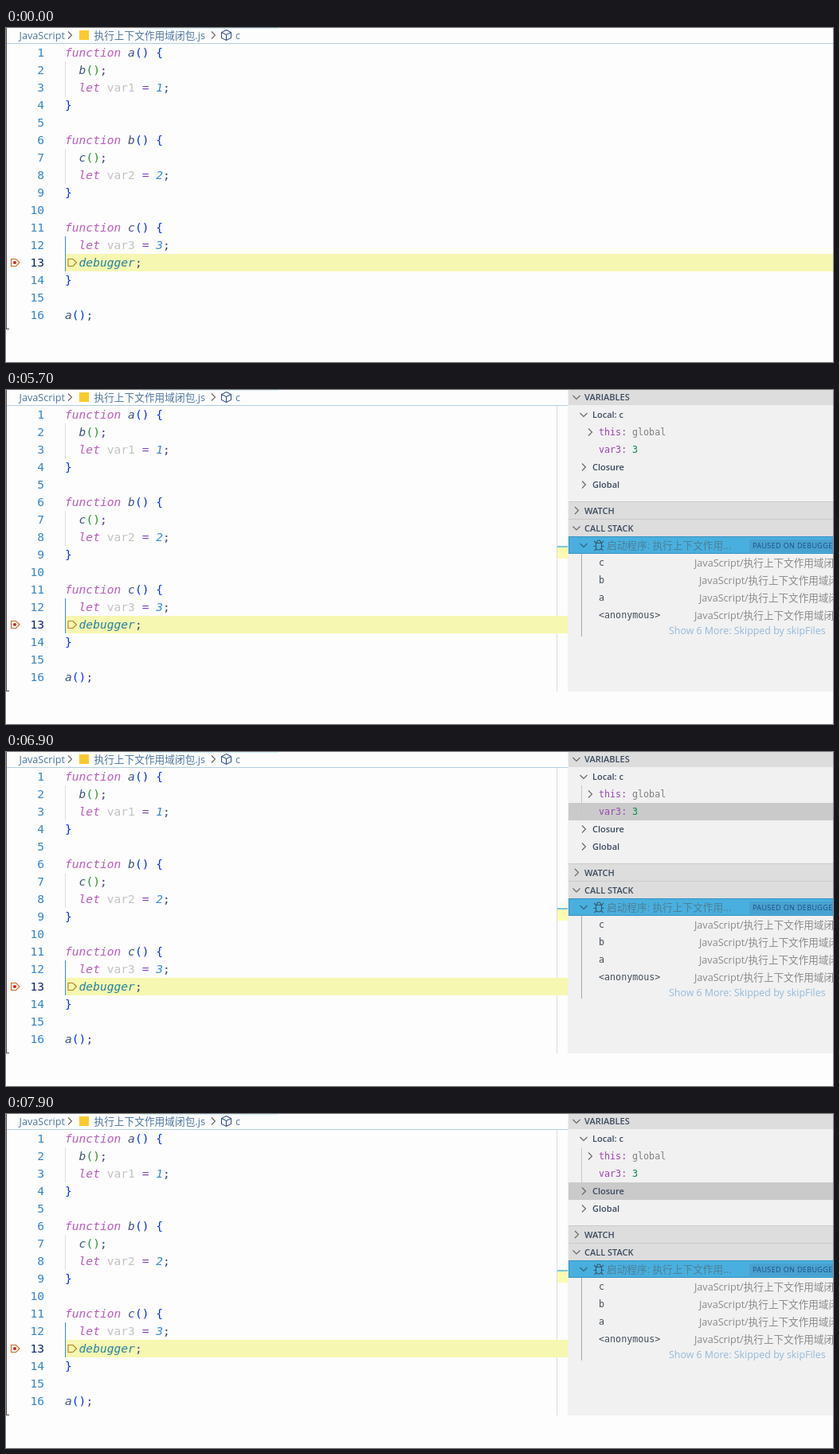
Animation of 1038 by 420 pixels, one loop 8000 ms. Source, as an HTML page:

```html
<!DOCTYPE html>
<html lang="zh">
<head>
<meta charset="utf-8">
<title>Debugger panel</title>
<style>
html, body { margin: 0; width: 100%; height: 100%; overflow: hidden; background: #fdfdfd; }
svg { display: block; width: 1038px; height: 420px; }
text { white-space: pre; font-family: "Open Sans", "Noto Sans CJK SC", "Noto Sans CJK", sans-serif; }
.code { font: 14.6px "DejaVu Sans Mono", monospace; }
.mono { font: 11.7px "DejaVu Sans Mono", monospace; }
.head { font-weight: 600; }
.icon { fill: none; stroke-width: 1.1; }
</style>
</head>
<body>
<svg id="stage" viewBox="0 0 1038 420">
  <defs><filter id="glow" x="-10%" y="-60%" width="120%" height="220%"><feGaussianBlur stdDeviation="2.5"/></filter></defs>
  <g id="editor"></g>
  <rect id="patch" x="932" y="101" width="106" height="37" fill="#fff"/>
  <g id="tips"></g>
  <g id="panel"></g>
</svg>
<script>
const $ = id => document.getElementById(id);
const rect = (x, y, w, h, fill, more = '') =>
  `<rect x="${x}" y="${y}" width="${w}" height="${h}" fill="${fill}" ${more}/>`;
const text = (x, y, str, size, fill, more = '') =>
  `<text x="${x}" y="${y}" font-size="${size}" fill="${fill}" ${more}>${str}</text>`;
const mono = (x, y, str, fill) => text(x, y, str, 11.7, fill, 'class="mono"');
const icon = (d, stroke) => `<path class="icon" d="${d}" stroke="${stroke}"/>`;
const right = (x, y, color = '#666') => icon(`M${x - 2} ${y - 4.5}l4.5 4.5l-4.5 4.5`, color);
const down = (x, y, color = '#666') => icon(`M${x - 4.5} ${y - 2}l4.5 4.5l4.5 -4.5`, color);
const marker = (x, color) => icon(`M${x + .5} 290.5h6l4.5 4.5l-4.5 4.5h-6z`, color);
const FILE = '执行上下文作用域闭包.js';

// Code
const SOURCE = `function a() {
  b();
  let var1 = 1;
}

function b() {
  c();
  let var2 = 2;
}

function c() {
  let var3 = 3;
  debugger;
}

a();`;

function highlight(line) {
  const bracket = line[0] === ' ' ? '#319331' : '#0431fa';
  return line.replace(/[a-z]+\d?|\d|[(){}=;]/g, token => {
    const color = /^(function|let)$/.test(token) ? '#b95bbd'
      : /^var/.test(token) ? '#c3c3c3'
      : token === 'debugger' ? '#2484a0'
      : /\d/.test(token) ? '#3b8bce'
      : token === '=' ? '#8149b5'
      : token === ';' ? '#3b4a78'
      : /\w/.test(token) ? '#41557f' : bracket;
    const italic = /[a-z]+$|^\d/.test(token) ? ' font-style="italic"' : '';
    return `<tspan fill="${color}"${italic}>${token}</tspan>`;
  });
}

const lines = SOURCE.split('\n').map((line, i) => {
  const y = 36 + i * 22;
  return text(48, y, i + 1, 14.6, i === 12 ? '#0b216f' : '#3586c8', 'class="code" text-anchor="end"')
    + text(74, y, highlight(line), 14.6, '#333', 'class="code"');
}).join('');

$('editor').innerHTML =
  rect(170, 0, 172, 1, '#d5f0fa') + rect(0, 19, 1038, 1, '#b3cfdf')
  + rect(0, 0, 1, 379, '#5b4a4c') + rect(0, 378, 4, 1, '#5b4a4c')
  + text(16.5, 14, 'JavaScript', 12.7, '#4f76a0') + right(80, 9)
  + rect(92, 3, 12, 12, '#fdca2c')
  + text(110.5, 14, FILE, 12.7, '#4f76a0') + right(260, 9)
  + icon('M276.5 2.5l6 3v7l-6 3l-6 -3v-7zM270.5 5.5l6 3l6 -3M276.5 8.5v7', '#354f88')
  + text(288, 14, 'c', 12.7, '#4f76a0')
  + rect(74, 284, 964, 22, '#f6f7b1')
  + rect(74, 42, 1, 44, '#dedede') + rect(74, 152, 1, 44, '#dedede') + rect(74, 262, 1, 44, '#3d8fc9')
  + lines + marker(6, '#c96a22') + '<circle cx="11" cy="295" r="2" fill="#d6231f"/>' + marker(77.5, '#b9831f');

// Tooltips
const tip = (id, x, y, label) => `<g id="${id}">`
  + rect(x - 1, y + 1, 300, 26, '#27a5dd', 'filter="url(#glow)"')
  + rect(x + .5, y + .5, 300, 24, '#fdfdfd', 'stroke="#4c5f70"')
  + text(x + 9, y + 17, label, 11.8, '#333') + '</g>';
$('tips').innerHTML = tip('sourceTip', 937, 106, 'Source Control (Ctrl+Shift+G)')
  + tip('debugTip', 842, 153, 'Run and Debug (Ctrl+Shift+D) - 1 active session');

// Side panel
const section = (y, h, label, arrow) => rect(706, y, 332, h, '#dddddd')
  + arrow(716, y + h / 2) + text(726, y + h / 2 + 4, label, 11, '#3a4a5e', 'class="head"');
const scope = (y, label, arrow) => arrow(725, y) + text(736, y + 4, label, 11, '#3a4a5e', 'class="head"');
const call = (y, name, x) => mono(744, y + 4, name, '#444f5c')
  + text(x, y + 5, `JavaScript/${FILE}`, 12.6, '#8a8a8a');

$('panel').innerHTML =
  rect(691, 20, 14, 359, '#fdfdfd') + rect(691, 20, 1, 359, '#dcdcdc') + rect(691, 284, 14, 22, '#f6f7b1')
  + rect(692, 196, 14, 2, '#79c5df') + rect(692, 198, 13, 14, '#fbfbb0')
  + rect(691, 20, 14, 359, '#1d639b', 'id="slider"')
  + rect(705, 0, 333, 379, '#f1f1f1')
  + rect(706, 0, 332, 22, '#cacaca', 'id="hover"')
  + section(-1, 20, 'VARIABLES', down)
  + scope(31, 'Local: c', down) + rect(722, 42, 1, 44, '#c6c6c6', 'id="guide"')
  + right(733, 53) + mono(744, 57, 'this:', '#9b46b0') + mono(786, 57, 'global', '#808080')
  + mono(744, 79, 'var3:', '#9b46b0') + mono(786, 79, '3', '#098658')
  + scope(97, 'Closure', right) + scope(119, 'Global', right)
  + rect(706, 140, 332, 1, '#cacaca') + section(141, 21, 'WATCH', right)
  + rect(706, 162, 332, 1, '#cacaca') + section(163, 21, 'CALL STACK', down)
  + rect(706.5, 184.5, 340, 21, '#49afde', 'stroke="#3593c4"')
  + down(725, 195, '#35607a')
  + icon('M740.5 192.5h7v5a3.5 3.5 0 0 1 -7 0zM741.5 192a2.5 3 0 0 1 5 0M738 190l2.5 2.5M750 190l-2.5 2.5M737.5 196.5h3M747.5 196.5h3M738.5 202l2.5 -2.5M749.5 202l-2.5 -2.5', '#35576c')
  + text(754, 200, '启动程序: 执行上下文作用...', 12.7, '#4d7f98')
  + rect(933, 188, 110, 16, '#48a2d0') + text(937, 199, 'PAUSED ON DEBUGGER', 9, '#1d4c87', 'letter-spacing=".37"')
  + rect(722, 206, 1, 104, '#a9a9a9')
  + call(217, 'c', 864) + call(239, 'b', 870) + call(261, 'a', 870) + call(283, '&lt;anonymous&gt;', 864)
  + text(832, 307, 'Show 6 More: Skipped by skipFiles', 12.4, '#94b9da');

// Each step holds until the next: [start, value]
const HOVER = [[0, 0], [5800, 206], [5900, 228], [6000, 250], [6100, 228], [6300, 0],
  [6700, 108], [6800, 86], [6900, 64], [7000, 42], [7100, 20],
  [7300, 42], [7400, 64], [7500, 86], [7600, 108], [7900, 86]];
const SLIDER = [[0, 0], [6400, .11], [6500, .22], [6700, .11], [6800, 0]];
const SOURCE_TIP = [[0, 0], [400, .5], [500, 1], [600, 0]];
const DEBUG_TIP = [[0, 0], [2300, .5], [2400, 1], [5700, 0]];
const at = (steps, t) => steps.findLast(([start]) => start <= t)[1];
const show = (id, opacity) => $(id).setAttribute('opacity', +opacity);

function draw(now) {
  const t = now % 8000, row = at(HOVER, t);
  show('sourceTip', at(SOURCE_TIP, t));
  show('debugTip', at(DEBUG_TIP, t));
  show('patch', t >= 600);
  show('panel', t >= 5700);
  show('slider', at(SLIDER, t));
  show('hover', row > 0);
  show('guide', t >= 6700);
  $('hover').setAttribute('y', row);
  requestAnimationFrame(draw);
}
draw(performance.now());
</script>
</body>
</html>
```
